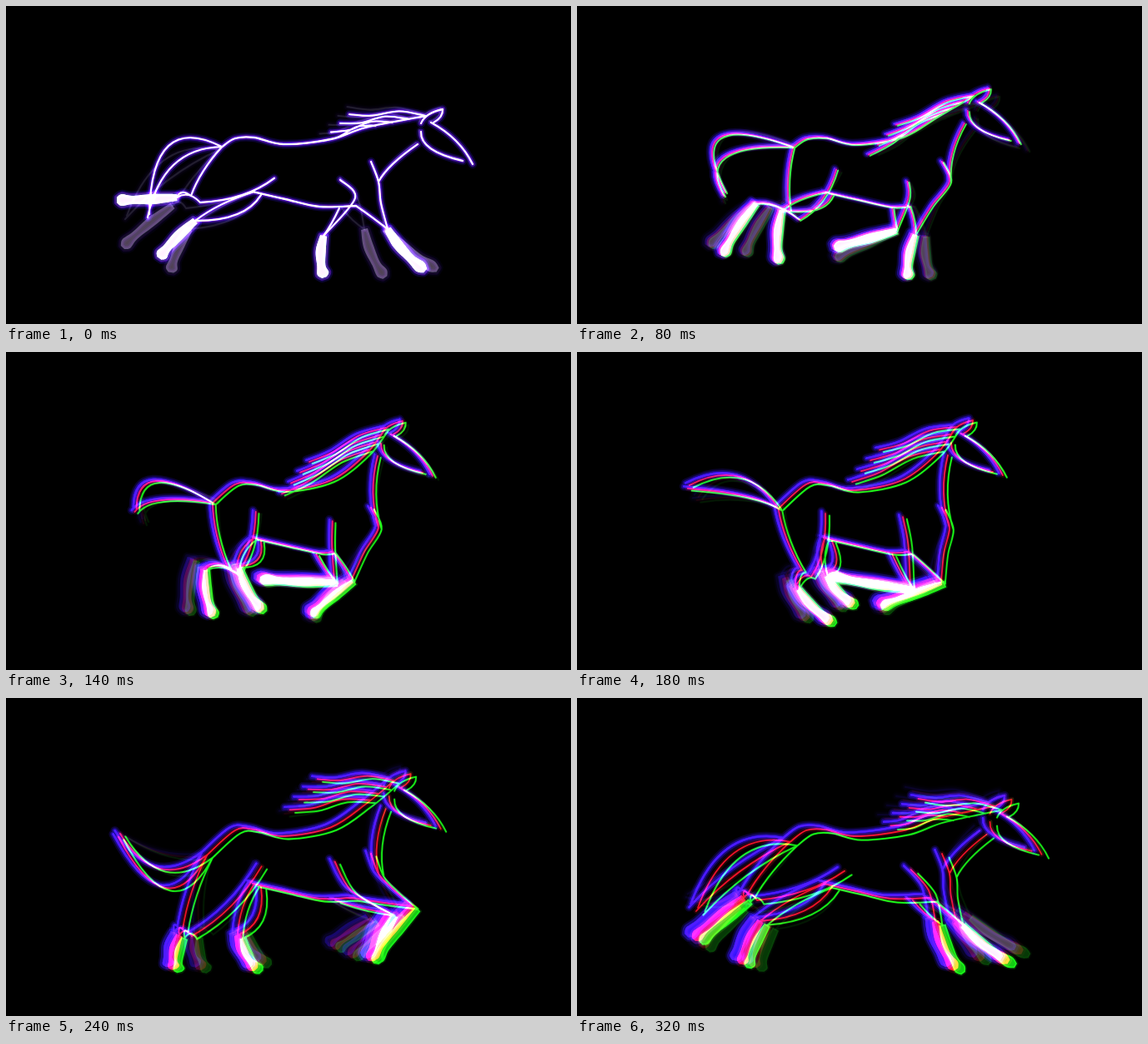
An HTML page with a canvas for the animation above (0.34 s loop, 678 by 382 pixels).

```html
<!DOCTYPE html>
<html lang="en">
<head>
<meta charset="utf-8">
<title>Neon gallop</title>
<style>
html, body { margin: 0; width: 100%; height: 100%; overflow: hidden; background: #000; }
canvas { display: block; width: 678px; height: 382px; }
</style>
</head>
<body>
<canvas id="stage" width="678" height="382"></canvas>
<script>
const LOOP = 340, STEP = 20;
const ctx = document.getElementById('stage').getContext('2d');

// Joints that travel far: x,y at each key time.
const KEYS = [0, 40, 100, 180, 240, 280, 320, LOOP];
const legs = {
  hindFar: {
    knee: [205, 230, 215, 235, 213, 238, 262, 282, 208, 285, 190, 260, 200, 240],
    hoof: [133, 233, 142, 278, 190, 311, 306, 325, 202, 326, 157, 308, 140, 290]
  },
  hindNear: {
    knee: [227, 258, 218, 238, 258, 248, 296, 266, 278, 285, 240, 278, 220, 268],
    hoof: [184, 303, 160, 291, 283, 318, 332, 304, 300, 326, 228, 328, 198, 320]
  },
  foreFar: {
    knee: [381, 276, 372, 272, 388, 268, 400, 284, 460, 258, 473, 253, 430, 268],
    hoof: [382, 326, 310, 317, 305, 276, 297, 266, 438, 316, 519, 303, 455, 326]
  },
  foreNear: {
    knee: [458, 268, 430, 278, 392, 272, 437, 276, 488, 250, 473, 250, 455, 268],
    hoof: [503, 318, 455, 327, 368, 328, 360, 304, 438, 314, 551, 293, 518, 317]
  }
};
const seatKeys = [222, 228, 242, 236, 262, 255, 270, 262, 212, 278, 195, 255, 205, 235];
const tailMid = [195, 168, 182, 155, 165, 160, 195, 150, 185, 205, 185, 240, 190, 185];
const tailTip = [172, 250, 178, 240, 178, 216, 135, 160, 137, 163, 138, 228, 145, 252];

const mix = (a, b, k) => [a[0] + (b[0] - a[0]) * k, a[1] + (b[1] - a[1]) * k];
const add = (p, x, y) => [p[0] + x, p[1] + y];
const wave = (t, peak) => Math.cos(2 * Math.PI * (t - peak) / LOOP);

function track(keys, t) {
  const i = KEYS.findIndex((k, n) => t < KEYS[n + 1]);
  const at = n => keys.slice(n % 7 * 2, n % 7 * 2 + 2);
  return mix(at(i), at(i + 1), (t - KEYS[i]) / (KEYS[i + 1] - KEYS[i]));
}

// Smooth curve through all points.
function curve(path, pts, join) {
  const at = i => pts[Math.max(0, Math.min(pts.length - 1, i))];
  if (join) path.lineTo(...pts[0]); else path.moveTo(...pts[0]);
  for (let i = 0; i < pts.length - 1; i++) {
    const [a, b, c, d] = [at(i - 1), at(i), at(i + 1), at(i + 2)];
    path.bezierCurveTo(b[0] + (c[0] - a[0]) / 6, b[1] + (c[1] - a[1]) / 6,
      c[0] - (d[0] - b[0]) / 6, c[1] - (d[1] - b[1]) / 6, c[0], c[1]);
  }
}

// Arc from a to b by way of m.
function arc(path, a, m, b) {
  path.moveTo(...a);
  path.quadraticCurveTo(2 * m[0] - (a[0] + b[0]) / 2, 2 * m[1] - (a[1] + b[1]) / 2, ...b);
}

// Lower leg: slim shank, bent fetlock, flared hoof with a narrow toe.
function limb(path, knee, hoof) {
  const half = [4, 6, 5, 7, 3];
  const pts = [0, 0.35, 0.7, 0.9, 1].map(k => add(mix(knee, hoof, k), -16 * k * (1 - k), 4 * k * (1 - k)));
  const left = [], right = [];
  pts.forEach(([x, y], i) => {
    const a = pts[Math.max(0, i - 1)], b = pts[Math.min(4, i + 1)];
    const angle = Math.atan2(b[1] - a[1], b[0] - a[0]);
    const dx = -Math.sin(angle) * half[i], dy = Math.cos(angle) * half[i];
    left.push([x + dx, y + dy]);
    right.unshift([x - dx, y - dy]);
  });
  curve(path, left);
  curve(path, right, true);
  path.closePath();
}

function horse(t) {
  const lines = new Path2D(), fills = new Path2D(), knee = {};
  const bow = (a, b, x, y) => arc(lines, a, add(mix(a, b, 0.5), x, y), b);
  const flow = (...pts) => curve(lines, pts);

  for (const name in legs) {
    knee[name] = track(legs[name].knee, t);
    limb(fills, knee[name], track(legs[name].hoof, t));
  }

  // The head rises and draws back as the body gathers.
  const reach = ((1 + wave(t, 0)) / 2) ** 1.5;
  const head = (x, y) => [x - 49 * (1 - reach), y - 42 * (1 - reach)];
  bow(head(510, 140), head(560, 190), 5, -3);
  bow(head(498, 151), head(548, 186), -13, 3);
  bow(head(498, 141), head(524, 124), -4, -2);
  bow(head(513, 140), head(524, 124), 3, 1);

  const poll = head(504, 132), crest = [432, 122 + 24 * reach];
  const rump = add([251, 178], 11 * wave(t, 40), -12 * wave(t, 40));
  flow(poll, crest, [390, 154 + 6 * reach], [333, 166], [298, 158], [275, 159], rump);

  const lift = 15 + 28 * wave(t, 120);
  for (let i = 0; i < 4; i++) {
    const root = mix(poll, crest, i * 0.28);
    const tip = add(poll, -92 - 11 * i, lift + 9 * i + (crest[1] - poll[1]) * i * 0.12);
    flow(root, add(mix(root, tip, 0.35), 0, -5), add(mix(root, tip, 0.7), 0, 1), tip);
  }

  const mid = track(tailMid, t), tip = track(tailTip, t);
  arc(lines, rump, mid, tip);
  arc(lines, rump, add(mid, 6, 23), add(tip, -2, 4));

  // Hindquarters
  const seat = track(seatKeys, t), stifle = add(seat, 11, 8);
  const thigh = [310 + 12 * wave(t, 0), 200 + 8 * wave(t, 310)];
  bow(rump, seat, -4, 0);
  bow(thigh, stifle, 5, 6);
  bow(stifle, knee.hindFar, 0, -6);
  bow(seat, knee.hindFar, -2, -5);
  bow([306, 227], knee.hindNear, 10, 8);
  bow([298, 223], knee.hindNear, -4, -2);

  // Belly, chest and forelegs
  const girth = [408 + 16 * wave(t, 300), 240];
  flow([296, 223], [335, 232], [376, 241], girth);
  flow([396 + 5 * wave(t, 0), 204 + 8 * wave(t, 50)], add(girth, -1, -9), knee.foreFar);
  bow(add(girth, -20, 3), knee.foreFar, 0, 2);
  const chest = [447, 211];
  flow([438, 187], chest, add(mix(chest, knee.foreNear, 0.45), -2, 0), knee.foreNear);
  bow(girth, knee.foreNear, 2, 1);
  bow(head(494, 166), chest, -6, 1);

  return { lines, fills };
}

// Colour, side of the split, and glow as [extra width, alpha].
const LAYERS = [
  { color: 'rgb(52,18,245)', side: -1, width: 2.4, glow: [[8, 0.2], [4, 0.35]] },
  { color: 'rgb(210,15,35)', side: 0, width: 1.8, glow: [[4, 0.18]] },
  { color: 'rgb(20,205,20)', side: 1, width: 1.8, glow: [[1.5, 0.2]] }
];

function paint({ lines, fills }, layer, lineAlpha, fillAlpha) {
  const stroke = (path, width, alpha) => {
    ctx.lineWidth = width;
    ctx.globalAlpha = alpha;
    ctx.stroke(path);
  };
  ctx.strokeStyle = ctx.fillStyle = layer.color;
  for (const [extra, alpha] of layer.glow) {
    stroke(lines, layer.width + extra, alpha * lineAlpha);
    stroke(fills, layer.width + extra, alpha * fillAlpha);
  }
  stroke(lines, layer.width, lineAlpha);
  ctx.globalAlpha = fillAlpha;
  ctx.fill(fills);
}

function draw(t) {
  const now = horse(t), echo = horse((t + LOOP - STEP) % LOOP);
  const split = 8.5 * t / 320;
  ctx.globalCompositeOperation = 'source-over';
  ctx.globalAlpha = 1;
  ctx.fillStyle = '#000';
  ctx.fillRect(0, 0, 678, 382);
  ctx.globalCompositeOperation = 'lighter';
  ctx.lineCap = ctx.lineJoin = 'round';
  for (const layer of LAYERS) {
    ctx.save();
    ctx.translate(layer.side * split, layer.side * split * 0.55);
    paint(echo, layer, 0.1, 0.28);
    paint(now, layer, 0.95, 1);
    ctx.restore();
  }
}

const start = performance.now();
let shown = -1;
function tick() {
  const t = Math.floor((performance.now() - start) % LOOP / STEP) * STEP;
  if (t !== shown) draw(shown = t);
  requestAnimationFrame(tick);
}
tick();
</script>
</body>
</html>
```
